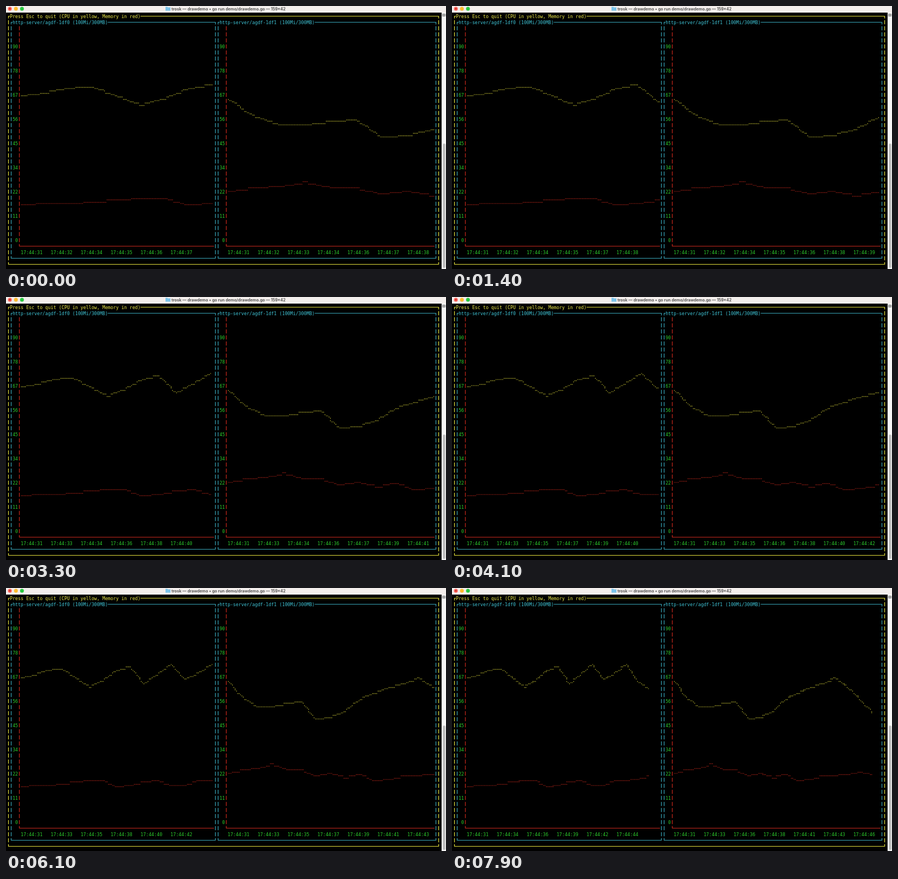
An HTML page for the animation above (8 s loop, 800 px wide and 478 px high).

```html
<!DOCTYPE html>
<html lang="en">
<head>
<meta charset="utf-8">
<title>Load charts</title>
<style>
  html, body { margin: 0; width: 800px; height: 478px; overflow: hidden; background: #000; }
  svg { display: block; }
  text { white-space: pre; font: 8.22px "DejaVu Sans Mono", monospace; }
  .bar { font: 600 7.3px Inter, sans-serif; }
  path { fill: none; }
</style>
</head>
<body>
<svg id="stage" width="800" height="478" viewBox="0 0 800 478">
  <rect width="800" height="478" fill="#000"/>
  <rect width="800" height="12" fill="#f3eeec"/>
  <circle cx="7" cy="5" r="3.5" fill="#fe5f57"/>
  <circle cx="7" cy="5" r="1" fill="#8c1a10"/>
  <circle cx="18" cy="5" r="3.5" fill="#febc2e"/>
  <circle cx="29" cy="5" r="3.5" fill="#28c840"/>
  <path d="M290 1.5h3.5l1 1h4.5v6h-9z" style="fill:#7cc4ea"/>
  <text class="bar" x="301" y="7.6" fill="#444">trosk — drawdemo • go run demo/drawdemo.go — 159×42</text>
  <rect x="792" y="12" width="8" height="466" fill="#f8f8f8"/>
  <rect x="794" y="250" width="5" height="226" rx="2.5" fill="#c0c0c0"/>
  <path d="M793.5 14.5h5v4h-5zM793.5 16.5h5M796 14.5v4" stroke="#555" stroke-width=".7"/>
</svg>
<script>
const stage = document.getElementById('stage');
const YELLOW = '#e3df3c', CYAN = '#38a5b8', RED = '#c8281c', GREEN = '#2ccb2c';

// Terminal grid: centre of a column and of a row.
const cx = col => 4.5 + 4.95 * col;
const cy = row => 18.5 + 11 * row;

function add(tag, attrs, text = '') {
  const el = document.createElementNS('http://www.w3.org/2000/svg', tag);
  for (const k in attrs) el.setAttribute(k, attrs[k]);
  el.textContent = text;
  return stage.appendChild(el);
}
const write = (col, row, fill, text) =>
  add('text', { x: cx(col) - 2.475, y: cy(row) + 3, fill }, text);
const stroke = (d, color, width = 1.2) =>
  add('path', { d, stroke: color, 'stroke-width': width });

// Box-drawing verticals leave a gap between rows.
function bars(col, from, to) {
  let d = '';
  for (let r = from; r <= to; r++) d += `M${cx(col)} ${cy(r) - 3.8}v7.6`;
  return d;
}

function box(left, right, top, bottom, color, titleColor, title) {
  const l = cx(left), r = cx(right), t = cy(top), b = cy(bottom);
  stroke(bars(left, top + 1, bottom - 1) + bars(right, top + 1, bottom - 1) +
    `M${l} ${t + 4}V${t}H${l + 2.5}M${l + 2.5 + title.length * 4.95} ${t}H${r}v4` +
    `M${l} ${b - 4}V${b}H${r}v-4`, color);
  write(left + 1, top, titleColor, title);
}

// Curves are given by their height, in dots, at every tenth sample.
function chart(left, right, title, cpu, mem) {
  box(left, right, 1, 40, CYAN, '#3fc4d6', title);
  const axis = left + 3;
  stroke(bars(axis, 2, 37) + `M${cx(axis)} ${cy(38) - 4}V${cy(38)}H${cx(right - 1) + 2.5}`, RED);
  for (let i = 0; i < 9; i++)
    write(left + 1, 37 - 4 * i, GREEN, String(Math.round(11.2 * i)).padStart(2));
  const labels = [];
  for (let c = axis + 1; c + 8 <= right; c += 11) labels.push(write(c, 39, GREEN, ''));
  return {
    first: axis + 1,
    dots: 2 * (right - axis - 1) - 1,
    labels,
    lines: [[mem, stroke('', RED)], [cpu, stroke('', YELLOW)]]
  };
}

box(0, 158, 0, 41, YELLOW, '#f0ec4c', 'Press Esc to quit (CPU in yellow, Memory in red)');
const charts = [
  chart(1, 76, 'http-server/agdf-1df0 (100Mi/300MB)',
    [46, 44, 40.7, 40, 46, 52, 47.5, 41, 38.6, 50, 43.5, 37, 47, 43, 37, 48, 53],
    [118, 117, 117, 116, 115, 114, 114, 118, 117, 115, 114, 117, 117, 114, 114, 112.7, 111]),
  chart(77, 157, 'http-server/agdf-1df1 (100Mi/300MB)',
    [48, 59, 65, 65, 63, 62, 73, 72, 68, 60, 56, 52.4, 50, 46, 52, 60, 69],
    [109, 107, 106, 103, 106.6, 107, 111, 109, 112, 109.7, 114, 113, 111, 110.7, 110, 108, 110])
];

function sample(knots, i) {
  const k = Math.floor(i / 10), a = knots[k], b = knots[k + 1] ?? a;
  return Math.round(a + (b - a) * (i % 10) / 10);
}

// Braille dots: two across and four down in each cell.
function dot(first, x, y) {
  const px = cx(first + (x >> 1)) + (x & 1 ? 1.2 : -1.2);
  const py = cy(2 + (y >> 2)) + ((y & 3) - 1.5) * 2.2 + 0.6;
  return `M${(px - 0.6).toFixed(2)} ${py.toFixed(2)}h1.2`;
}

function trace(first, knots, last, step) {
  const seen = new Set();
  let x0 = 0, y0 = sample(knots, 0);
  for (let i = 1; i <= last; i++) {
    const x1 = Math.round(i / step), y1 = sample(knots, i);
    const n = Math.max(x1 - x0, Math.abs(y1 - y0), 1);
    for (let j = 0; j <= n; j++)
      seen.add(dot(first, Math.round(x0 + (x1 - x0) * j / n), Math.round(y0 + (y1 - y0) * j / n)));
    x0 = x1;
    y0 = y1;
  }
  return [...seen].join('');
}

// Samples per dot, rounded up so that all samples fit.
function scale(last, dots) {
  const s = last / dots, p = s < 1 ? 100 : 10;
  return Math.ceil(s * p) / p;
}

function draw(last) {
  for (const { first, dots, labels, lines } of charts) {
    const step = scale(last, dots);
    for (const [knots, path] of lines) path.setAttribute('d', trace(first, knots, last, step));
    labels.forEach((el, i) => {
      const sec = Math.floor(31.51 + Math.floor(22 * i * step) / 10);
      el.textContent = '17:44:' + sec;
    });
  }
}

// Ten new samples arrive at each of these times.
const updates = [600, 1700, 2700, 3700, 4700, 5700, 6800, 7800];
let shown = 0;
function tick() {
  const t = performance.now() % 8000;
  const last = 80 + 10 * updates.filter(u => u <= t).length;
  if (last !== shown) draw(shown = last);
  requestAnimationFrame(tick);
}
tick();
</script>
</body>
</html>
```
